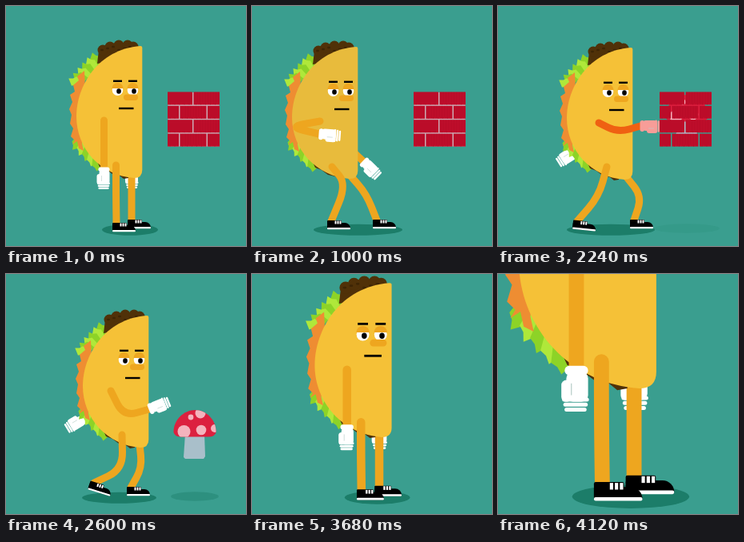
Animation, 300 px wide and 300 px high, one loop 5.12 s. Source, as an HTML page with a canvas:

```html
<!DOCTYPE html>
<html lang="en">
<head>
<meta charset="utf-8">
<title>Taco power-up</title>
<style>
  html, body { margin: 0; height: 100%; overflow: hidden; background: #3a9e8f; }
  canvas { display: block; width: 300px; height: 300px; }
</style>
</head>
<body>
<canvas id="stage" width="300" height="300"></canvas>
<script>
const ctx = document.getElementById('stage').getContext('2d');
const LOOP = 5120, STEP = 40, BREAK = 2240, EATEN = 3520;
const LIMB = '#eea61f';

const clamp = v => Math.max(0, Math.min(1, v));
const ease = p => p * p * (3 - 2 * p);
const mix = (a, b, p) => a.map((v, i) => v + (b[i] - v) * p);
const rgb = c => `rgb(${c.map(Math.round)})`;

// Limbs: joint, bend, end (x, y each), then the angle of the hand or shoe.
const STAND = {
  body: [0, 0, 0], shadow: [155, 35],
  arm: [122.5, 143, 122.5, 172, 122.5, 202, 0],
  farArm: [150, 150, 156, 175, 158, 201, 0],
  leg: [137.5, 199, 137.5, 235, 138, 272, 0],
  farLeg: [157, 205, 157, 235, 157, 268, 0]
};
const WIND = {
  body: [-38, 1, 1], shadow: [132.5, 55.5],
  arm: [85, 144, 46, 151, 84, 160, -1.5],
  farArm: [110, 165, 124, 180, 139, 194, -.8],
  leg: [100, 201, 118, 223, 99, 269, 0],
  farLeg: [122, 211, 143, 235, 156, 268, 0]
};
const PUNCH = {
  body: [-2, 2, 0], shadow: [141, 55],
  arm: [126, 146, 150, 158, 178, 150, -1.57],
  farArm: [135, 150, 115, 165, 98, 182, 1],
  leg: [136, 201, 126, 238, 99, 269, .1],
  farLeg: [160, 213, 180, 238, 170, 268, 0]
};
const WALK = {
  body: [8, 2, 0], shadow: [141.5, 46.5],
  arm: [131, 146, 147, 178, 179, 169, -1.95],
  farArm: [135, 150, 120, 165, 99, 180, 1.03],
  leg: [145, 201, 146, 244, 110, 261, .3],
  farLeg: [167, 213, 170, 242, 156, 267, 0]
};
const TIMELINE = [[0, STAND], [160, STAND], [700, WIND], [2080, WIND],
  [2200, PUNCH], [2320, PUNCH], [2600, WALK], [2860, STAND], [LOOP, STAND]];
const GROWTH = [[0, 1], [EATEN, 1], [3720, 1.21], [3800, 1.12], [3920, 1.5],
  [3980, 1.35], [4040, 1.67], [4120, 2.09], [LOOP, 2.09]];

function segment(keys, t) {
  const i = keys.findIndex(k => k[0] > t);
  const [t0, from] = keys[i - 1], [t1, to] = keys[i];
  return { from, to, p: (t - t0) / (t1 - t0) };
}

function poseAt(t) {
  const { from, to, p } = segment(TIMELINE, t), pose = {};
  for (const part in from) pose[part] = mix(from[part], to[part], ease(p));
  if (from === STAND && to === WIND) pose.leg[5] -= 9 * Math.sin(Math.PI * p);
  if (from === WIND && to === WIND) {
    const sway = Math.sin((t - 1000) / 220 * Math.PI) * clamp((t - 700) / 100);
    const pull = 10 * ease(clamp((t - 1920) / 160));
    pose.arm[2] += 5 * sway - pull;
    pose.arm[4] += 4 * sway - pull;
    pose.farArm[4] += sway;
    pose.farArm[5] -= sway;
    pose.leg[2] += 2 * sway;
    pose.farLeg[2] += 2 * sway;
    pose.body[0] -= pull / 5;
  }
  return pose;
}

function poly(points, color) {
  ctx.fillStyle = color;
  ctx.beginPath();
  points.forEach(p => ctx.lineTo(...p));
  ctx.fill();
}

function ellipse(x, y, rx, ry, color) {
  ctx.fillStyle = color;
  ctx.beginPath();
  ctx.ellipse(x, y, rx, ry, 0, 0, 7);
  ctx.fill();
}

function round(x, y, w, h, r, color) {
  ctx.fillStyle = color;
  ctx.beginPath();
  ctx.roundRect(x, y, w, h, r);
  ctx.fill();
}

function line(x1, y1, x2, y2, width, color) {
  ctx.strokeStyle = color;
  ctx.lineWidth = width;
  ctx.beginPath();
  ctx.moveTo(x1, y1);
  ctx.lineTo(x2, y2);
  ctx.stroke();
}

function at(x, y, angle, draw) {
  ctx.save();
  ctx.translate(x, y);
  ctx.rotate(angle);
  draw();
  ctx.restore();
}

function limb([x0, y0, kx, ky, x1, y1, angle], color, drawEnd) {
  ctx.strokeStyle = color;
  ctx.lineWidth = 9;
  ctx.lineCap = 'round';
  ctx.beginPath();
  ctx.moveTo(x0, y0);
  ctx.lineTo((x0 + kx) / 2, (y0 + ky) / 2);
  ctx.quadraticCurveTo(kx, ky, (kx + x1) / 2, (ky + y1) / 2);
  ctx.lineTo(x1, y1);
  ctx.stroke();
  ctx.lineCap = 'butt';
  at(x1, y1, angle, drawEnd);
}

function hand(color) {
  round(-6, 3, 13, 18, 4, color);
  round(-9, 8, 6, 13, 3, color);
  for (let i = 0; i < 3; i++) round(-8.5 + i * .7, 18.5 + i * 3, 16 - i * 1.4, 2.4, 1.2, color);
  round(-7, -.5, 14, 5.5, 2.7, color);
  line(-3, 10, -3, 17, .6, '#b9cfca');
}

function shoe() {
  round(-5, -1, 18, 10, 1, '#000');
  round(-5, 2, 29, 8, [1, 7, 1, 1], '#000');
  round(-5, 8, 29, 2.2, 1, '#fff');
  for (let i = 0; i < 3; i++) line(5.5 + i * 3, -.5, 5.5 + i * 3, 3.5, 2, '#fff');
}

function leaf(x, y, angle, length, color) {
  at(x, y, angle, () => poly([[-2, -6], [length * .4, -5], [length * .5, -7],
    [length, -1], [length * .7, 2], [length * .55, 6], [-2, 6]], color));
}

function toppings() {
  const greens = ['#8dd327', '#afe83a'];
  // Lettuce fans out around the two ends of the shell.
  for (let i = 0; i < 6; i++) {
    leaf(114 - i * 4.3, 73 + i * 5, -1.9 - i * .14, 16, greens[i % 2]);
  }
  for (let i = 0; i < 5; i++) {
    leaf(93 + i * 5.3, 166 + i * 6.7, 2.25 - i * .14, 17 - i * .8, greens[i % 2]);
  }
  poly([[98, 81], [89, 88], [91, 93], [84, 99], [86, 107], [80, 111], [83, 120],
    [79, 129], [82, 136], [80, 147], [84, 153], [81, 163], [86, 168], [83, 173],
    [89, 169], [91, 178], [97, 181], [95, 172], [100, 130]], '#ee8d32');
  const brown = '#503108';
  poly([[114, 72], [116, 55], [128, 47], [158, 46], [165, 52], [140, 68]], brown);
  [[121, 55], [130, 51], [141, 49], [152, 49], [159, 51]].forEach(([x, y]) => ellipse(x, y, 6.5, 6.5, brown));
  for (let i = 0; i < 6; i++) ellipse(120 + i * 7, 55 - i % 3 * 2, 2, 1.2, '#3d2505');
  poly([[112, 190], [117, 201], [125, 204], [133, 210], [142, 212], [147, 216], [153, 215], [153, 200]], brown);
}

function face() {
  for (const x of [139.5, 158.5]) {
    ellipse(x, 105, 6.8, 7, '#fff');
    ctx.fillStyle = LIMB;
    ctx.beginPath();
    ctx.arc(x, 103, 7, Math.PI, 0);
    ctx.fill();
    ellipse(x + 1.5, 106.5, 2.8, 3.2, '#000');
    line(x - 5.5, 93.8, x + 5.5, 93.8, 2.4, '#000');
  }
  round(147, 110.5, 18, 7.5, 3.7, LIMB);
  line(141, 128, 159.5, 128, 2.4, '#000');
}

function shell(tone) {
  ctx.fillStyle = rgb(mix([245, 193, 55], [232, 187, 60], tone));
  ctx.beginPath();
  ctx.moveTo(168, 50);
  ctx.bezierCurveTo(115, 54, 88, 100, 88, 138);
  ctx.bezierCurveTo(88, 178, 118, 212, 160, 215);
  ctx.quadraticCurveTo(170.3, 215, 170.3, 205);
  ctx.lineTo(170.3, 52);
  ctx.quadraticCurveTo(170.3, 50, 168, 50);
  ctx.fill();
}

function taco(t) {
  const pose = poseAt(t), { from, to, p } = segment(GROWTH, t);
  const scale = from + (to - from) * p;
  const heat = t < BREAK ? clamp((t - 1040) / 800) : 1 - clamp((t - BREAK) / 160);
  ctx.save();
  ctx.translate(145, 281);
  ctx.scale(scale, scale);
  ctx.translate(-145, -281);
  ellipse(pose.shadow[0], 279.7, pose.shadow[1], 7, '#1c7d69');
  limb(pose.farArm, LIMB, () => hand('#fff'));
  limb(pose.farLeg, LIMB, shoe);
  at(pose.body[0], pose.body[1], 0, () => {
    toppings();
    shell(pose.body[2]);
    face();
  });
  limb(pose.leg, LIMB, shoe);
  limb(pose.arm, rgb(mix([238, 166, 31], [239, 97, 18], heat)),
    () => hand(rgb(mix([255, 255, 255], [247, 157, 152], heat))));
  ctx.restore();
}

const bricks = [];
for (let row = 0; row < 4; row++) {
  const seams = row % 2 ? [202, 217.5, 252, 268.5] : [202, 234.5, 268.5];
  for (let i = 1; i < seams.length; i++) {
    bricks.push({ x: seams[i - 1], y: 107.5 + row * 17.4, w: seams[i] - seams[i - 1] - 1.5, h: 15.9 });
  }
}

function brick(w, h) {
  ctx.fillStyle = '#c40d2b';
  ctx.fillRect(-w / 2, -h / 2, w, h);
  for (let x = 1; x < w; x += 2) line(x - w / 2, -h / 2, x - w / 2, h / 2 - x % 3, .6, '#a90d28');
}

function wall(t) {
  const age = (t - BREAK) / 1000;
  if (age > .3) return;
  if (age < 0) {
    ctx.fillStyle = '#c9a9b2';
    ctx.fillRect(202.5, 108, 64, 67.5);
  }
  const time = Math.max(0, age);
  ctx.globalAlpha = clamp((.3 - time) / .12);
  bricks.forEach(({ x, y, w, h }, i) => {
    const cx = x + w / 2, cy = y + h / 2;
    const vx = 160 + (cx - 235) * 6, vy = (cy - 145) * 4 - 60;
    const shrink = 1 - time;
    at(cx + vx * time, cy + vy * time + 900 * time * time, (i % 2 ? 9 : -7) * time,
      () => brick(w * shrink, h * shrink));
  });
  ctx.globalAlpha = 1;
}

function mushroom(t) {
  if (t < BREAK || t >= EATEN) return;
  const fall = Math.min(106, 59 * ((t - 2280) / 320) ** 2 * (t > 2280));
  const landed = fall / 106;
  const x = 236 - 26 * Math.max(0, t - 2960) / 280;
  ctx.globalAlpha = .15 + .85 * landed ** 2;
  ellipse(x, 278, 41 - 20 * landed, 5.8, '#1c7d69');
  ctx.globalAlpha = 1;
  at(x, 172 + fall, 0, () => {
    poly([[-12, -31], [12, -31], [13, -3], [11, 0], [-12, 0], [-14, -2]], '#a9bfca');
    ctx.save();
    ctx.beginPath();
    ctx.moveTo(-26.5, -33);
    ctx.bezierCurveTo(-27, -49, -13, -61, 0, -61);
    ctx.bezierCurveTo(15, -61, 27, -48, 26.5, -33);
    ctx.quadraticCurveTo(25, -27.5, 17, -27.5);
    ctx.lineTo(-17, -27.5);
    ctx.quadraticCurveTo(-25, -27.5, -26.5, -33);
    ctx.clip();
    ctx.fillStyle = '#dc203f';
    ctx.fillRect(-30, -65, 60, 40);
    [[-13.5, -34, 8], [8, -36, 6.3], [-5, -52, 3.4], [7, -57, 6.5], [25, -38, 5]]
      .forEach(([sx, sy, r]) => ellipse(sx, sy, r, r, '#f4b3bd'));
    ctx.restore();
  });
}

function frame(now) {
  const t = Math.floor(now % LOOP / STEP) * STEP;
  ctx.fillStyle = '#3a9e8f';
  ctx.fillRect(0, 0, 300, 300);
  taco(t);
  mushroom(t);
  wall(t);
  requestAnimationFrame(frame);
}
requestAnimationFrame(frame);
</script>
</body>
</html>
```
